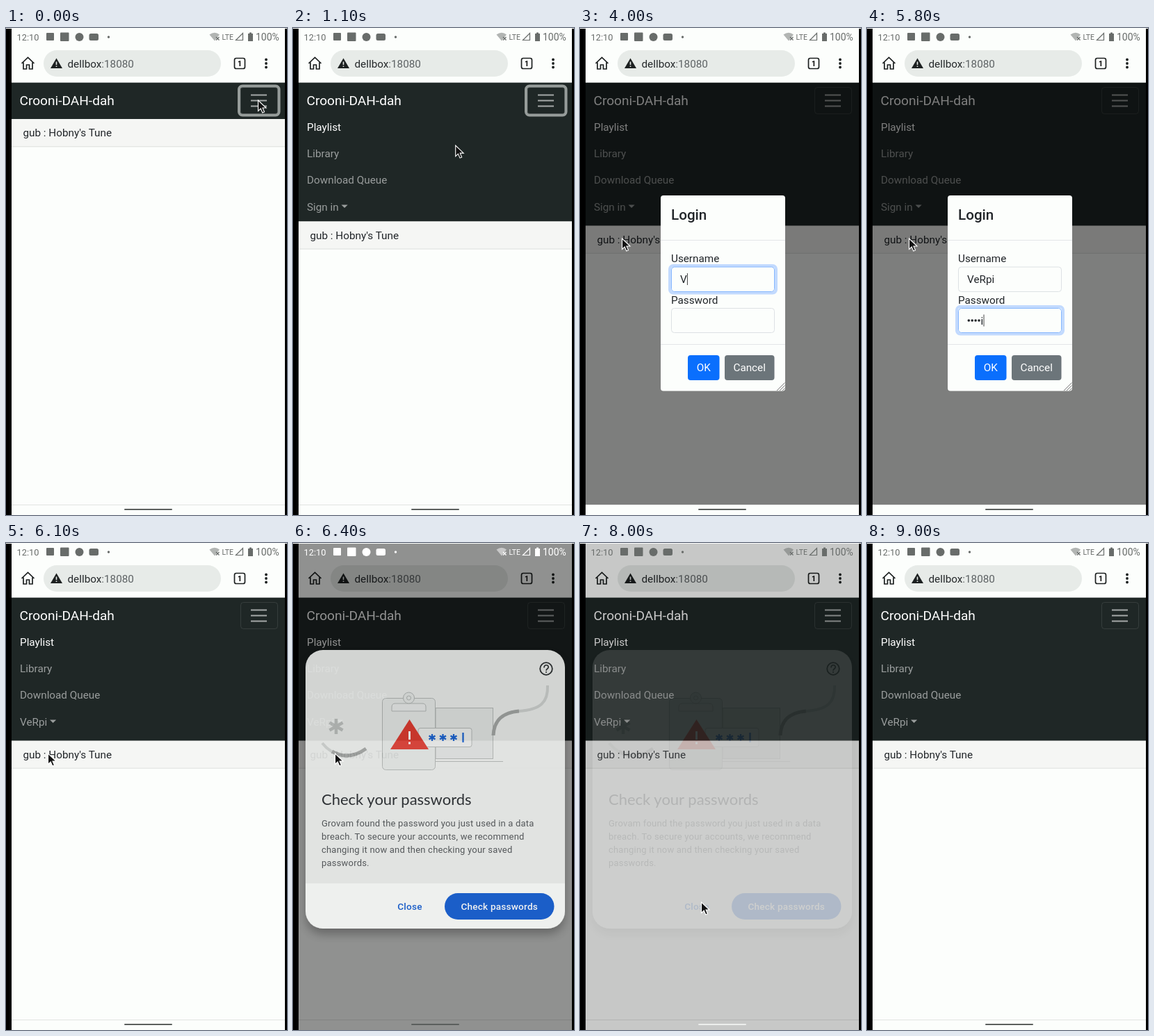
These frames come from a looping animation (404 px wide and 701 px high, 9100 ms). An HTML page:

```html
<!DOCTYPE html>
<html lang="en">
<head>
<meta charset="utf-8">
<title>Sign-in demo</title>
<style>
  html, body { margin: 0; width: 100%; height: 100%; overflow: hidden; background: #000; }
  svg { display: block; }
  text { font: 15.28px Roboto, sans-serif; white-space: pre; }
  .brand { font-size: 19.1px; fill: #fff; }
  .muted { fill: #fff; fill-opacity: .55; }
  .mid { text-anchor: middle; }
  .ink { fill: #212529; }
  .paper { fill: #fcfefc; }
  .body { font-size: 13px; letter-spacing: .2px; fill: #4c5053; }
  .action { font-size: 13.6px; font-weight: 500; letter-spacing: .2px; text-anchor: middle; }
</style>
</head>
<body>
<svg width="404" height="701" viewBox="0 0 404 701">
  <defs>
    <clipPath id="screen"><rect x="8" width="393" height="701"/></clipPath>
    <clipPath id="navClip"><rect id="navArea" x="8" y="79" width="393" height="52"/></clipPath>
    <filter id="soft" x="-10%" y="-10%" width="120%" height="125%">
      <feDropShadow dx="0" dy="8" stdDeviation="7" flood-opacity=".32"/>
    </filter>
  </defs>
  <rect width="404" height="701"/>
  <rect class="paper" width="404" height="1"/>
  <g clip-path="url(#screen)">
    <rect class="paper" x="8" width="393" height="701"/>

    <!-- browser toolbar -->
    <rect x="54" y="32" width="255" height="38" rx="19" fill="#e7ebe8"/>
    <path d="M22.5 51 31.5 42.5 40.5 51M25 49.5V59H29.5V53H33.5V59H38V49.5" fill="none" stroke="#1c2020" stroke-width="1.7"/>
    <path d="M72.5 43.5 81 58H64Z" fill="#1c2020"/>
    <path d="M72.5 48.5V53M72.5 54.5V56" stroke="#e7ebe8" stroke-width="1.6"/>
    <text x="88.5" y="56.5" fill="#24282a">dellbox<tspan fill="#5d6264">:18080</tspan></text>
    <rect x="328.5" y="43.5" width="15" height="15" rx="2.5" fill="none" stroke="#1c2020" stroke-width="1.7"/>
    <text class="mid" x="336" y="55" style="font-size:10.5px;font-weight:700">1</text>
    <g fill="#1c2020"><circle cx="374" cy="45.5" r="1.9"/><circle cx="374" cy="51" r="1.9"/><circle cx="374" cy="56.5" r="1.9"/></g>
    <path d="M8 78.5H401" stroke="#a9adab"/>

    <!-- playlist row -->
    <g id="row">
      <rect x="8" y="130" width="393" height="40.5" fill="#f5f6f4"/>
      <path d="M8 170.8H401" stroke="#dcdfdc"/>
      <text class="ink" x="24.5" y="156.3">gub : Hobny's Tune</text>
    </g>

    <!-- navigation -->
    <g clip-path="url(#navClip)">
      <rect x="8" y="79" width="393" height="206" fill="#1f2726"/>
      <text x="20" y="147.5" fill="#fff">Playlist</text>
      <text class="muted" x="20" y="186">Library</text>
      <text class="muted" x="20" y="224.3">Download Queue</text>
      <g id="account" fill="#fff"><text id="accountName" x="20" y="262.5"/><path id="accountCaret" d="M0 254.5H9.2L4.6 259.1Z"/></g>
    </g>
    <text class="brand" x="19.5" y="111">Crooni-DAH-dah</text>
    <rect x="337.5" y="85.5" width="53" height="38" rx="4" fill="none" stroke="#fff" stroke-opacity=".1"/>
    <rect id="ring" x="335" y="83.5" width="57.5" height="42" rx="5" fill="none" stroke="#969c9a" stroke-width="4"/>
    <path d="M352 96.5H375M352 104.5H375M352 112.5H375" stroke="#fff" stroke-opacity=".6" stroke-width="1.8"/>

    <g id="menu">
      <rect class="paper" x="20.5" y="278.5" width="152" height="185" rx="4" stroke="#d0d2d1"/>
      <rect x="21" y="287" width="151" height="30.5" fill="#f0f2f3"/>
      <path d="M21 356.5H172" stroke="#e2e4e5"/>
      <g class="ink"><text x="36" y="307.5">Login</text><text x="36" y="338">Register</text><text x="36" y="385">Settings</text><text x="36" y="415.5">Help</text><text x="36" y="446">About</text></g>
    </g>

    <!-- login dialog -->
    <rect id="backdrop" x="8" y="79" width="393" height="607"/>
    <g id="login">
      <rect class="paper" x="116" y="241" width="179" height="281.5" rx="4"/>
      <path d="M116 305.5H295M116 455.5H295" stroke="#e3e6e8"/>
      <text class="ink" x="131" y="276" style="font-size:20.6px;font-weight:500">Login</text>
      <text class="ink" x="131" y="337">Username</text>
      <text class="ink" x="131" y="396.5">Password</text>
      <rect id="glow" x="129" width="153" height="39.5" rx="5" fill="none" stroke="#c2dafe" stroke-width="4"/>
      <rect id="userBox" class="paper" x="131.5" y="344" width="148" height="35.5" rx="4"/>
      <rect id="passBox" class="paper" x="131.5" y="403.5" width="148" height="35" rx="4"/>
      <text id="user" class="ink" x="144" y="367"/>
      <g id="dots" class="ink"></g>
      <text id="last" class="ink" y="426.5"/>
      <path id="caret" stroke="#444" d="M0 0V17"/>
      <rect x="155" y="471" width="45.5" height="36" rx="4" fill="#0a6ffd"/>
      <rect x="208" y="471" width="71.5" height="36" rx="4" fill="#6c757a"/>
      <text class="mid" x="177.7" y="494.3" fill="#fff">OK</text>
      <text class="mid" x="243.7" y="494.3" fill="#fff">Cancel</text>
      <path d="M283 522 294.5 510.5M287 522 294.5 514.5M291 522 294.5 518.5" stroke="#777"/>
    </g>

    <!-- password warning -->
    <rect id="scrim" x="8" y="1" width="393" height="700"/>
    <g id="warning">
      <rect class="paper" x="18" y="154" width="373" height="401" rx="25" filter="url(#soft)"/>
      <path id="tint" d="M18 490V179Q18 154 43 154H366Q391 154 391 179V490Z"/>
      <g fill="none" stroke="#b4b8b6">
        <rect x="205" y="237.5" width="82.5" height="73" fill="#e4e7e5"/>
        <path d="M205 314.5H302"/>
        <rect x="128.5" y="223.5" width="76" height="103" rx="5" fill="#e7eae8"/>
        <path d="M142 242V236Q142 231 147 231H186Q191 231 191 236V242Z" fill="#eceeec"/>
        <circle cx="166.5" cy="223" r="8" fill="#e7eae8"/><circle cx="166.5" cy="223" r="3"/>
        <path d="M288 277C289 254 302 244 325 242" stroke="#a3a6a4" stroke-width="5"/>
        <path d="M325 242C356 240 367 229 366 205" stroke="#cfd2d0" stroke-width="4"/>
        <path d="M42 288Q53 302 69 305" stroke="#cfd2d0" stroke-width="4"/>
        <path d="M56 300Q80 314 105 296" stroke="#a3a6a4" stroke-width="5"/>
        <path d="M62 253V275M52.5 258.5 71.5 269.5M52.5 269.5 71.5 258.5" stroke="#bfc2c0" stroke-width="4.5"/>
        <rect x="180" y="266.5" width="77" height="27" rx="3" fill="#eef0ee"/>
        <g id="stars" stroke="#1a63d2" stroke-width="2.3"></g>
        <path d="M244.5 273V287" stroke="#1a63d2" stroke-width="2.3"/>
      </g>
      <path d="M167.5 254 195 297H140Z" fill="#df3b30"/>
      <path d="M167.5 271V283M167.5 286.5V289.5" stroke="#fff" stroke-width="3"/>
      <circle cx="364" cy="181" r="8.8" fill="none" stroke="#2c3031" stroke-width="1.8"/>
      <path d="M361 179.5C361 174.5 367.2 174.8 367.2 178.7C367.2 181 364 181 364 183.8M364 185V186.8" fill="none" stroke="#2c3031" stroke-width="1.7"/>
      <text class="ink" x="41" y="376.5" style="font:22px Lato,sans-serif">Check your passwords</text>
      <text class="body" x="41" y="408">Grovam found the password you just used in a data</text>
      <text class="body" x="41" y="427">breach. To secure your accounts, we recommend</text>
      <text class="body" x="41" y="446">changing it now and then checking your saved</text>
      <text class="body" x="41" y="465">passwords.</text>
      <rect x="218" y="504" width="157.5" height="38" rx="19" fill="#0b57d0"/>
      <text class="action" x="168" y="528" fill="#0b57d0">Close</text>
      <text class="action" x="296.7" y="528" fill="#fff">Check passwords</text>
    </g>

    <!-- system bars -->
    <g id="status">
      <text x="15.5" y="17.5" style="font-size:12.8px">12:10</text>
      <rect x="58" y="7" width="11" height="11" rx="1"/>
      <rect x="78" y="6.5" width="12.5" height="12.5" rx="1"/>
      <circle cx="105.5" cy="13" r="6"/>
      <rect x="119.5" y="8" width="13.5" height="10" rx="2.5"/>
      <circle cx="147.5" cy="13" r="1.7"/>
      <path d="M292.5 9.5Q300 4 307 9.5L300 18.5Z" opacity=".5"/>
      <path d="M302 13 306.5 17.5M306.5 13 302 17.5" stroke="currentColor" stroke-width="1.3"/>
      <text x="310.5" y="17" style="font-size:10.5px">LTE</text>
      <path d="M330.5 17.5H340.5V7.5Z" fill="none" stroke="currentColor" stroke-width="1.2"/>
      <path d="M348 8H350V6.5H353V8H355V19H348Z"/>
      <text x="359" y="17.8" style="font-size:14px">100%</text>
    </g>
    <path d="M8 686.5H401" stroke="#000" stroke-opacity=".1"/>
    <rect id="pill" x="170" y="692" width="69" height="2" rx="1"/>
  </g>
  <path id="cursor" d="M0 0V15.5L3.7 12 6.3 18 9 16.8 6.5 11H11.5Z" fill="#111" stroke="#fff" stroke-width="1.1"/>
</svg>
<script>
const LOOP = 9100, STEP = 100, NAME = 'VeRpi', DOT = 4.9;
const el = {};
document.querySelectorAll('[id]').forEach(n => el[n.id] = n);
const set = (id, attrs) => { for (const k in attrs) el[id].setAttribute(k, attrs[k]); };
const show = (id, on) => set(id, { visibility: on ? 'visible' : 'hidden' });

const userKeys = [3900, 4100, 4300, 4500, 4700];
const passKeys = [5000, 5200, 5400, 5500, 5700];
const PASS_FOCUS = 4900;

// Tracks are [time, value] pairs joined by straight lines.
const tracks = {
  open: [[700, 0], [800, .12], [900, .5], [1000, .82], [1100, .96], [1200, 1]],
  shade: [[2700, 0], [2800, .17], [3000, .5], [5800, .5], [5900, .35], [6100, 0]],
  login: [[2700, 0], [2800, .3], [3000, 1], [5800, 1], [5900, .6], [6000, 0]],
  slide: [[2800, -40], [2900, -22], [3000, -9], [3200, 0], [5800, 0], [6000, -30]],
  scrim: [[6300, 0], [6400, .43], [6500, .6], [7800, .6], [7900, .42], [8000, .21], [8100, .05], [8200, 0]],
  warning: [[6300, 0], [6400, .88], [6500, 1], [7800, 1], [7900, .6], [8000, .12], [8100, 0]],
  tint: [[6400, .06], [6500, 0]],
  x: [[800, 362.5], [1500, 62], [1800, 62], [2100, 60.5], [6500, 60.5], [7300, 188], [7700, 174.5], [8200, 174.5], [8900, 46]],
  y: [[800, 104], [1500, 256], [1800, 256], [2100, 303], [6500, 303], [7300, 532], [7700, 517], [8200, 517], [8900, 0]]
};
function at(name, t) {
  const keys = tracks[name], i = keys.findIndex(k => k[0] > t);
  if (i === 0) return keys[0][1];
  if (i < 0) return keys[keys.length - 1][1];
  const [t0, a] = keys[i - 1], [t1, b] = keys[i];
  return a + (b - a) * (t - t0) / (t1 - t0);
}

el.stars.innerHTML = [200, 215.5, 231].map(x =>
  `<path d="M${x} 275v10m-4.5 -7.5l9 5m0 -5l-9 5"/>`).join('');
el.dots.innerHTML = [...NAME].map((_, i) => `<circle cx="${146.3 + DOT * i}" cy="421" r="1.8"/>`).join('');

function drawNav(t) {
  const drop = 153.4 * at('open', t);
  const signedIn = t >= 6100;
  set('navArea', { height: 52 + drop });
  set('row', { transform: `translate(0 ${drop})` });
  show('ring', t < 1700);
  show('menu', t >= 1800 && t < 2400);
  el.accountName.textContent = signedIn ? NAME : 'Sign in';
  set('account', { 'fill-opacity': t >= 1500 && t < 2800 ? 1 : .55 });
  set('accountCaret', { transform: `translate(${signedIn ? 63 : 69.5} 0)` });
}

function drawLogin(t) {
  const onPass = t >= PASS_FOCUS;
  const typed = userKeys.filter(k => k <= t).length;
  const hidden = passKeys.filter(k => k <= t).length;
  set('backdrop', { opacity: at('shade', t) });
  set('login', { opacity: at('login', t), transform: `translate(0 ${at('slide', t)})` });
  set('glow', { y: onPass ? 401 : 342 });
  set('userBox', { stroke: onPass ? '#dde1e4' : '#86b7fe' });
  set('passBox', { stroke: onPass ? '#86b7fe' : '#dde1e4' });
  el.user.textContent = NAME.slice(0, typed);
  [...el.dots.children].forEach((d, i) => d.setAttribute('visibility', i < hidden - 1 ? 'inherit' : 'hidden'));
  const lastX = 144 + DOT * Math.max(0, hidden - 1);
  el.last.textContent = hidden ? NAME[hidden - 1] : '';
  set('last', { x: lastX });

  const focused = onPass ? el.last : el.user;
  const end = (onPass ? lastX : 144) + focused.getComputedTextLength();
  const lastEvent = Math.max(...[3000, PASS_FOCUS, ...userKeys, ...passKeys].filter(k => k <= t), 0);
  set('caret', {
    transform: `translate(${end + .7} ${onPass ? 412.5 : 353})`,
    opacity: Math.floor((t - lastEvent) / 500) % 2 ? 0 : 1
  });
}

function drawWarning(t) {
  const dimmed = t >= 6400 && t < 8000;
  const ink = dimmed ? '#fff' : '#686c6a';
  set('scrim', { opacity: at('scrim', t) });
  set('warning', { opacity: at('warning', t) });
  set('tint', { opacity: at('tint', t) });
  set('status', { fill: ink, color: ink });
  set('pill', { fill: t >= 6500 && t < 8200 ? '#eceeec' : '#5b5f5d' });
}

function render(now) {
  const t = Math.floor(now % LOOP / STEP) * STEP;
  drawNav(t);
  drawLogin(t);
  drawWarning(t);
  set('cursor', { transform: `translate(${at('x', t)} ${at('y', t)})` });
  show('cursor', t < 9000);
}

const start = performance.now();
function tick() {
  render(performance.now() - start);
  requestAnimationFrame(tick);
}
tick();
</script>
</body>
</html>
```
